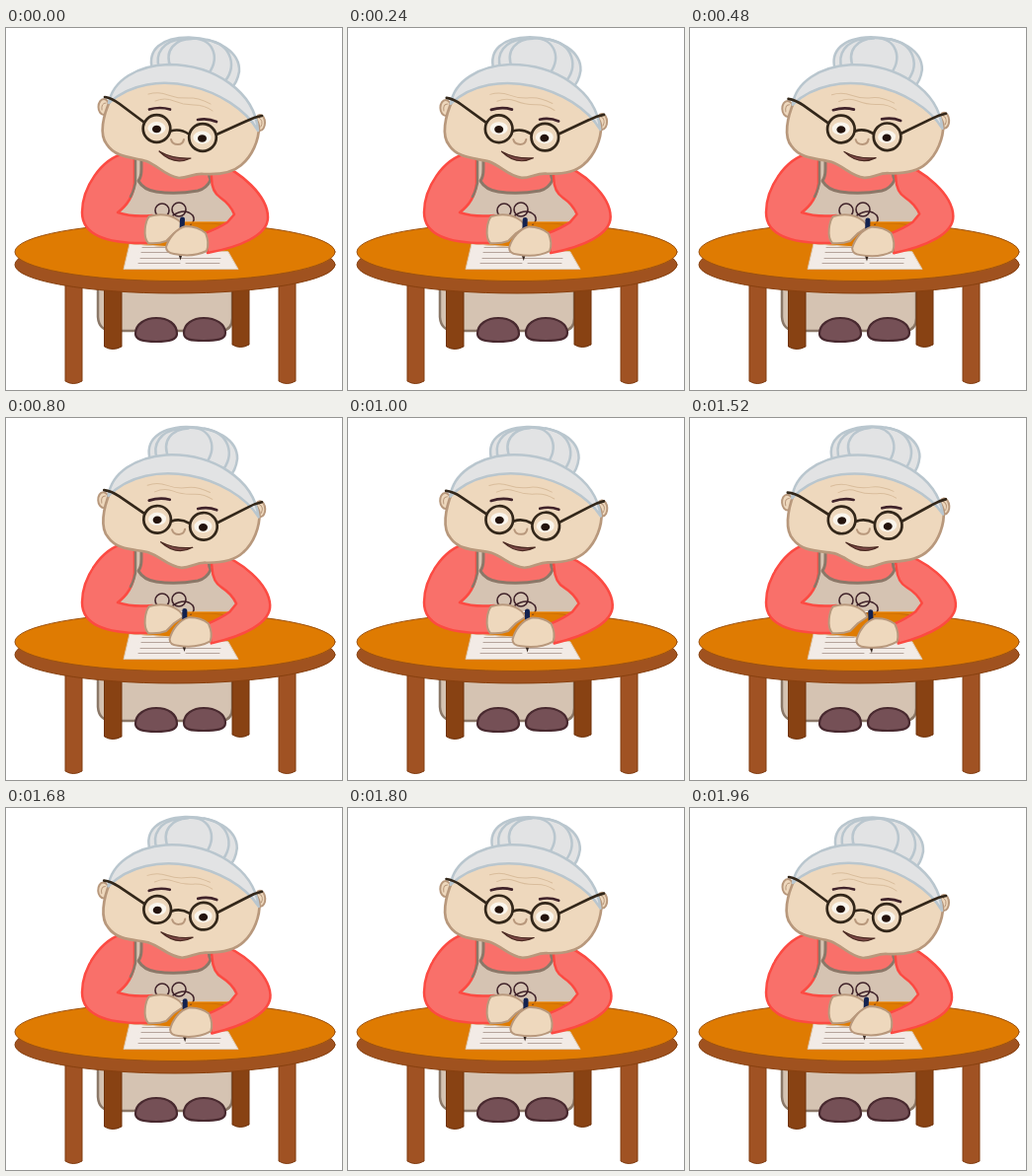
These frames come from a looping animation (340x367 px, 2000 ms). An HTML page:

```html
<!DOCTYPE html>
<html lang="en">
<head>
<meta charset="utf-8">
<title>Grandmother writing a letter</title>
<style>
html, body { margin: 0; width: 100%; height: 100%; overflow: hidden; background: #fff; }
svg { display: block; width: 340px; height: 367px; }
path, ellipse, circle { stroke-linejoin: round; stroke-linecap: round; }
.line { fill: none; }
.cloth { fill: #d5c3b2; stroke: #8b7868; stroke-width: 2.5; }
.wool { fill: #f9706a; stroke: #fc4a42; stroke-width: 2.5; }
.skin { fill: #eed8bd; stroke: #b8987c; stroke-width: 2; }
.hair { fill: #e2e3e4; stroke: #b9c6ce; stroke-width: 2.5; }
.bun { fill: none; stroke: #b9c6ce; stroke-width: 2.5; }
.shoe { fill: #755056; stroke: #48292f; stroke-width: 2.2; }
.back { fill: #884213; stroke: #70330b; }
.front { fill: #a05223; stroke: #803c10; }
.frame { fill: none; stroke: #33271a; stroke-width: 2.7; }
.dark { fill: none; stroke: #40232a; }
</style>
</head>
<body>
<svg viewBox="0 0 340 367">
  <!-- skirt, shoes, table legs -->
  <path class="cloth" d="M93 250V293Q94 307 108 307H218Q229 306 229 294V250Z"/>
  <path class="back" d="M99.500 255V323Q108 328 117 323V255ZM229 255V321Q237 326 246 321V255Z"/>
  <path class="shoe" d="M131 310C131 300 141 294 152 294C164 294 173 300 173 310C173 316 166 318 152 318S131 316 131 310ZM222 309C222 300 212 294 200 294C189 294 180 300 180 309C180 316 187 317 200 317S222 316 222 309Z"/>
  <path class="front" d="M60 250V358Q68 363 77 358V250ZM276 250V358Q284 363 293 358V250Z"/>

  <!-- table -->
  <ellipse cx="171" cy="240" rx="162" ry="29" fill="#a0521f" stroke="#87400f"/>
  <ellipse cx="171" cy="227" rx="162" ry="29.500" fill="#df7b02" stroke="#9c5211"/>

  <!-- body -->
  <path d="M128 130H214L226 162L238 180Q238 192 228 196H148L113 188Z" fill="#d5c3b2"/>
  <g class="dark" stroke-width="1.600">
    <circle cx="158" cy="185" r="7"/>
    <circle cx="175" cy="184" r="7"/>
    <path d="M169 190Q181 182 189 190Q192 195 187 199"/>
  </g>
  <path d="M181 197.500H228" stroke="#df7b02" stroke-width="2.500"/>
  <path d="M137 130V143Q137 151 134 155Q139 164 152 166Q172 169 194 165Q203 163 207 154Q204 148 205 130Z" fill="#f9706a" stroke="#8b7868" stroke-width="3"/>

  <path d="M125 219L119 244.500H235L225 227Z" fill="#f2ebe6" stroke="#ddc7ad"/>
  <path class="line" stroke="#b5a49c" d="M138 222.500H166M137 227.500H184M136 233.500H217M134 238.500H176M182 238.500H216"/>

  <path class="wool" d="M120 127C96 133 77 162 77 187C77 209 100 219 143 218L148 190Q128 192 113 187Q128 176 130 158V133Z"/>
  <path class="line" stroke="#8b7868" stroke-width="2.500" d="M131 134V157Q129 166 126 171"/>
  <path class="skin" d="M145 191C155 188 166 189 173 194Q179 198 179 202L170 208L162 216Q154 219 144 218C138 212 141 195 145 191Z"/>

  <g id="arm">
    <path d="M178.500 194L177 228" stroke="#13224f" stroke-width="5" stroke-linecap="round"/>
    <path d="M174 228H179L176.500 235.500Z" fill="#33251f"/>
    <path class="wool" d="M207 136L213 137C237 145 265 170 265 192C265 210 237 222 204 228L201 208Q215 203 224 197L231 189Q227 179 217 172Q208 166 208 152Z"/>
    <path class="skin" d="M162 222C165 212 173 203 182 201Q194 201 202 208Q206 218 203 226C193 231 180 231 170 229Q162 228 162 222Z"/>
  </g>

  <g id="head">
    <path class="hair" d="M148 42C143 22 157 9.500 185 9.500C216 10.500 237 25 236 44Q234 56 227 62Z"/>
    <path class="bun" d="M155 41C150 25 160 13 178 11M167 41C159 22 172 11 188 11M189 10.500C211 11 218 32 202 50M204 12C229 17 235 40 219 57"/>
    <ellipse class="skin" cx="99" cy="80" rx="5.500" ry="8"/>
    <ellipse class="skin" cx="257" cy="96" rx="5" ry="8"/>
    <path class="line" stroke="#b8987c" d="M97 83Q96 76 101 76M258 100Q261 94 256 91"/>
    <path class="skin" style="stroke-width:2.700" d="M106 72C98 89 94 108 102 118C111 132 129 131 142 135C155 140 161 150 175 152C185 152 190 147 200 148C217 149 230 146 238 139C249 130 256 114 256 100C248 60 130 34 106 72Z"/>
    <path class="hair" d="M104 76C108 53 133 38 164 37C211 37 252 65 255 104C230 61 148 36 104 76Z"/>
    <path class="line" stroke="#d9bd9c" d="M144 67Q154 64 164 68T184 71T207 77M151 74Q161 70 170 74T190 78T209 84"/>
    <path class="dark" stroke-width="2.700" d="M145 82.500Q156 79.500 166 82.500M194 93Q204 91 213 95"/>
    <g fill="#faf5ec">
      <ellipse cx="152.500" cy="101.500" rx="9" ry="6.500"/>
      <ellipse cx="198.500" cy="111" rx="9" ry="6.500"/>
    </g>
    <g fill="#24140e">
      <ellipse cx="152.500" cy="102.500" rx="4.500" ry="3.800"/>
      <ellipse cx="198.500" cy="112" rx="4.500" ry="3.800"/>
    </g>
    <circle class="frame" cx="152.500" cy="102" r="13.800"/>
    <circle class="frame" cx="199" cy="111" r="13.800"/>
    <path class="frame" d="M166.500 104.500Q176 101.500 185 107.500M100 70Q107 71 115 77L139 95M213 108L244 94Q252 90 259 89"/>
    <path class="line" stroke="#b8987c" stroke-width="2" d="M167 113Q168 118 174 118Q179 118 180 113"/>
    <path d="M155 125Q169 133 187 132Q170 140 155 125Z" fill="#7d4a48" stroke="#4b2a22" stroke-width="1.200"/>
  </g>
</svg>
<script>
const LOOP = 2000, STEP = 40, PEAK = 1500;
const arm = document.getElementById('arm');
const head = document.getElementById('head');

const turn = (part, angle, x, y) =>
  part.setAttribute('transform', `rotate(${angle} ${x} ${y})`);

function draw() {
  const t = Math.floor(performance.now() % LOOP / STEP) * STEP;
  const end = LOOP - STEP;
  const sway = t < PEAK ? t / PEAK : (end - t) / (end - PEAK);
  turn(head, -4.6 * sway, 172, 88);
  turn(arm, -4.6 * sway, 215, 140);
  requestAnimationFrame(draw);
}
draw();
</script>
</body>
</html>
```
